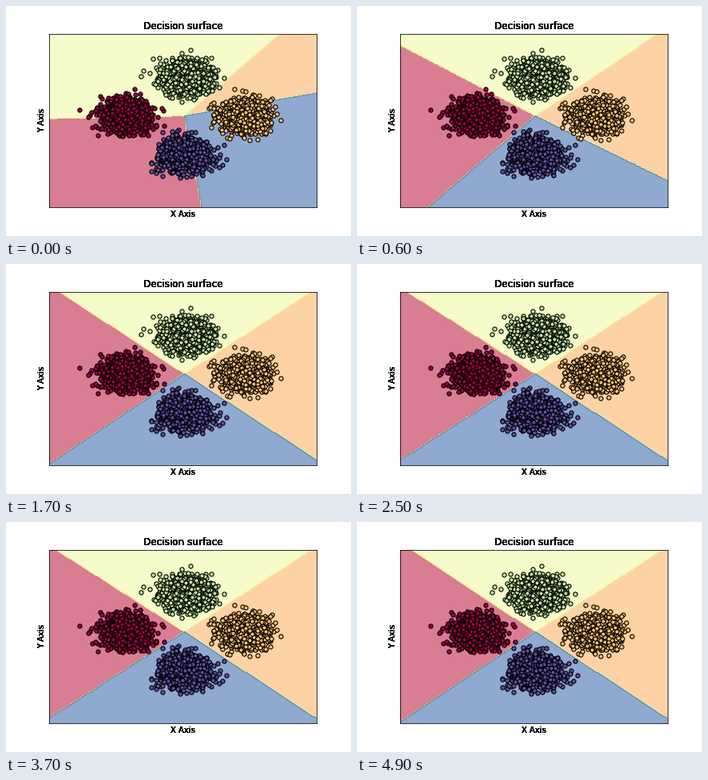
These frames come from a looping animation (432 by 288 pixels, 5 s). A matplotlib script:

```python
import numpy as np
import matplotlib.pyplot as plt
from matplotlib.animation import FuncAnimation

WIDTH, HEIGHT, DPI = 432, 288, 72
LEFT, RIGHT = 0.125 * WIDTH, 0.9 * WIDTH
TOP, BOTTOM = 0.12 * HEIGHT, 0.875 * HEIGHT
CENTRE = np.array([223.3, 137.5])
UNIT = np.array([14.9, 9.9])  # pixels per data unit
FRAMES, INTERVAL = 50, 100
DECAY = 0.72  # share of the remaining error kept at each training step

plt.rcParams["font.family"] = "DejaVu Sans"
cmap = plt.get_cmap("Spectral")


def ray_angles(points):
    """Angles in degrees, in data units, from the centre to pixel positions."""
    dx, dy = ((np.asarray(points, float) - CENTRE) / UNIT).T
    return np.degrees(np.arctan2(-dy, dx))


def settled_angles(step):
    """Converged boundaries, with a slow sway on the red class's two sides."""
    sway = -np.cos(2 * np.pi * (step - 31) / 36)
    return ray_angles([(64.2 + 4 * sway, TOP), (383, TOP),
                       (RIGHT, 246), (LEFT, 247.3 + 3.5 * sway)])


# Boundaries in order: red-green, green-orange, orange-blue, blue-red
start = ray_angles([(LEFT, 141), (343, TOP), (RIGHT, 109), (245, BOTTOM)])
start[0] %= 360
start_error = start - settled_angles(0)


def boundary_angles(step):
    return settled_angles(step) + start_error * DECAY ** step


grid_x, grid_y = np.meshgrid(np.linspace(LEFT, RIGHT, 226),
                             np.linspace(TOP, BOTTOM, 220))
grid_angle = ray_angles(np.column_stack([grid_x.ravel(), grid_y.ravel()]))
grid_angle = grid_angle.reshape(grid_x.shape)


def predict(step):
    red_green, green_orange, orange_blue, blue_red = boundary_angles(step)
    turn = (grid_angle - blue_red) % 360
    limits = [orange_blue, green_orange, red_green]
    return np.select([turn < (a - blue_red) % 360 for a in limits],
                     [3.0, 1.0, 2.0], 0.0)


fig = plt.figure(figsize=(WIDTH / DPI, HEIGHT / DPI), dpi=DPI, facecolor="white")
ax = fig.add_axes([LEFT / WIDTH, 1 - BOTTOM / HEIGHT,
                   (RIGHT - LEFT) / WIDTH, (BOTTOM - TOP) / HEIGHT])
ax.set(xlim=(LEFT, RIGHT), ylim=(BOTTOM, TOP), xticks=[], yticks=[])
ax.set_autoscale_on(False)
for spine in ax.spines.values():
    spine.set_linewidth(0.8)

# One Gaussian blob per class: left, right, up, down
rng = np.random.default_rng(4)
for k, side in enumerate([(-5, 0), (5, 0), (0, -5), (0, 5)]):
    blob = rng.normal(side, 0.96, size=(1500, 2))
    x, y = (blob * UNIT + CENTRE + [1.2, 0]).T
    ax.scatter(x, y, s=27, color=[cmap(k / 3)], edgecolors="black",
               linewidths=1.1, zorder=2)


def heavy_text(x, y, label, size, copies=12, **style):
    """Overprint the text so its antialiased edges darken."""
    for _ in range(copies):
        ax.text(x, y, label, fontsize=size, ha="center", **style)


middle_x, middle_y = (LEFT + RIGHT) / 2, (TOP + BOTTOM) / 2
heavy_text(middle_x, TOP - 6, "Decision surface", 12, va="baseline")
heavy_text(middle_x, BOTTOM + 4, "X Axis", 10, va="top")
heavy_text(LEFT - 4, middle_y, "Y Axis", 10, va="bottom",
           rotation=90, rotation_mode="anchor")

LEVELS = np.arange(9) * 0.4
surface = None


def update(step):
    global surface
    if surface is not None:
        surface.remove()
    surface = ax.contourf(grid_x, grid_y, predict(step), levels=LEVELS,
                          cmap=cmap, vmin=0, vmax=3.2, alpha=0.6, zorder=0)
    return [surface]


anim = FuncAnimation(fig, update, frames=FRAMES, interval=INTERVAL,
                     init_func=lambda: [], repeat=True, repeat_delay=0)
plt.show()
```
